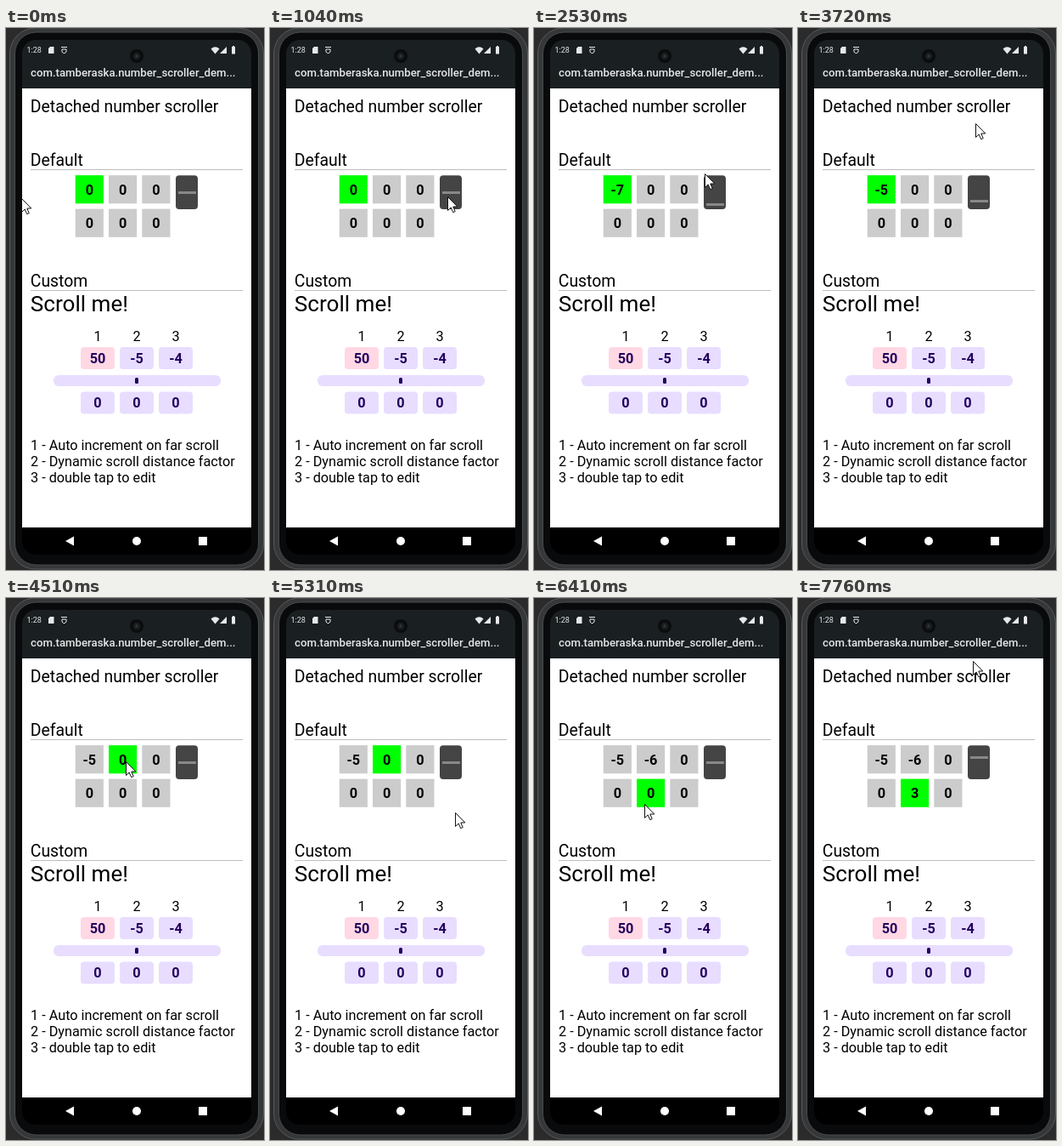
An HTML page that plays this animation: 304 px wide and 637 px high, repeating every 8000 ms.

```html
<!DOCTYPE html>
<html lang="en">
<head>
<meta charset="utf-8">
<title>Number scroller</title>
<style>
  html, body { margin: 0; width: 100%; height: 100%; overflow: hidden; background: #2b2b2c; }
  svg { display: block; width: 304px; height: 637px; font-family: Roboto, sans-serif; }
  .heading { font-size: 19.4px; }
  .large { font-size: 26.1px; }
  .note { font-size: 16.25px; }
  .mid { text-anchor: middle; }
  .number { font-size: 16.3px; font-weight: 700; text-anchor: middle; }
  .custom { fill: #21005d; }
  .light { fill: #e6e8e9; }
</style>
</head>
<body>
<svg viewBox="0 0 304 637">
  <rect width="304" height="637" fill="#2b2b2c"/>
  <rect x="4.5" y="0" width="299" height="636" rx="30" fill="#353739" stroke="#55585a"/>
  <rect x="10.5" y="5" width="287" height="626" rx="25" fill="#090a0b" stroke="#484b4d"/>

  <path d="M19 71V30a16 16 0 0 1 16-16H273a16 16 0 0 1 16 16V71Z" fill="#1a1f21"/>
  <rect x="19" y="71" width="270" height="516" fill="#fff"/>
  <path d="M19 587H289V603a16 16 0 0 1-16 16H35a16 16 0 0 1-16-16Z" fill="#000"/>

  <circle cx="154" cy="33" r="8" fill="#0b0c0d"/>
  <circle cx="154" cy="33" r="4.500" fill="#171b1d"/>
  <circle cx="154" cy="33" r="2" fill="#2a3436"/>

  <g class="light">
    <text x="24.500" y="29.300" font-size="9">1:28</text>
    <path d="M52 22h4.500v8h-6.500v-6Z"/>
    <path d="M65 22.500h7M66 25h5v3l-1.500 1.500h-2l-1.500-1.500Z" fill="none" stroke="#e6e8e9"/>
    <path d="M241.500 24.500q5-4.500 10 0l-5 6Z"/>
    <path d="M260 22v8h-8Z"/>
    <path d="M266 22h1v-1h2v1h1v8.500h-4Z"/>
    <text x="29" y="57.300" font-size="13.200" font-weight="500">com.tamberaska.number_scroller_dem...</text>
  </g>

  <g class="heading">
    <text x="28.800" y="99">Detached number scroller</text>
    <text x="28.800" y="162">Default</text>
    <text x="28.800" y="304">Custom</text>
  </g>
  <path d="M29 166.500H279M29 308.500H279" stroke="#bdbdbd"/>
  <text class="large" x="28.800" y="333">Scroll me!</text>

  <g id="cells"></g>
  <rect x="200" y="173.200" width="26" height="39.800" rx="4" fill="#444"/>
  <rect id="knob" x="203" y="192" width="21" height="3" fill="#888"/>

  <rect x="56" y="408" width="197" height="13" rx="6" fill="#e8ddff"/>
  <rect x="152" y="411" width="4" height="7" rx="1.500" fill="#21005d"/>

  <g class="note">
    <text x="29" y="496">1 - Auto increment on far scroll</text>
    <text x="29" y="515">2 - Dynamic scroll distance factor</text>
    <text x="29" y="534">3 - double tap to edit</text>
  </g>

  <g fill="#fff">
    <path d="M70 603l10-5.500v11Z"/>
    <circle cx="154" cy="603" r="5"/>
    <rect x="227" y="598" width="10" height="10"/>
  </g>
  <path id="cursor" d="M.5 .5V16.500L4.200 13 6.700 18.700 9.200 17.600 6.800 12H11.800Z" fill="#fff" stroke="#111"/>
</svg>
<script>
const LOOP = 8000;

// path points are [progress, x, y]; drag is [cell, from, to]
const moves = [
  { start: 70, end: 550, steps: 7, path: [[.15, 26, 199], [.6, 150, 187], [.85, 200, 190], [1, 208, 196]] },
  { start: 1040, end: 1810, steps: 11, path: [[1 / 11, 209, 198], [.4, 216, 250], [.8, 230, 350], [1, 233, 383]], drag: [0, 0, -7] },
  { start: 1900, end: 1900, steps: 1, path: [[1, 233, 387]] },
  { start: 2300, end: 2850, steps: 8, path: [[.125, 232, 372], [.5, 201, 171], [.625, 203, 167], [1, 212, 198]] },
  { start: 3330, end: 3720, steps: 6, path: [[1 / 6, 212, 188], [5 / 6, 209, 110], [1, 209, 112]], drag: [0, -7, -5] },
  { start: 3990, end: 4510, steps: 8, path: [[.125, 206, 118], [.6, 160, 170], [.875, 143, 193], [1, 141, 192]], select: 1 },
  { start: 4760, end: 5150, steps: 6, path: [[1 / 6, 150, 191], [4 / 6, 205, 185], [1, 218, 188]] },
  { start: 5310, end: 5710, steps: 6, path: [[1 / 6, 218, 252], [.6, 228, 360], [1, 235, 406]], drag: [1, 0, -6] },
  { start: 5940, end: 6410, steps: 7, path: [[1 / 7, 230, 398], [.6, 165, 290], [1, 130, 242]], select: 4 },
  { start: 6750, end: 7210, steps: 7, path: [[1 / 7, 129, 240], [5 / 7, 237, 190], [1, 216, 200]] },
  { start: 7380, end: 7760, steps: 6, path: [[1 / 6, 215, 188], [.8, 207, 85], [1, 206, 74]], drag: [4, 0, 3] }
];

const layer = document.getElementById('cells');
const knob = document.getElementById('knob');
const cursor = document.getElementById('cursor');

function add(tag, attrs, content = '') {
  const node = document.createElementNS('http://www.w3.org/2000/svg', tag);
  for (const name in attrs) node.setAttribute(name, attrs[name]);
  node.textContent = content;
  return layer.appendChild(node);
}

const cells = Array.from({ length: 6 }, (_, i) => {
  const x = 81.7 + 39.3 * (i % 3), y = 173.1 + 39.5 * Math.floor(i / 3);
  return {
    box: add('rect', { x, y, width: 33.2, height: 33.2 }),
    label: add('text', { x: x + 16.6, y: y + 22.7, class: 'number' })
  };
});

['50', '-5', '-4', '0', '0', '0'].forEach((value, i) => {
  const x = 88 + 46 * (i % 3), y = i < 3 ? 375 : 427.6;
  add('rect', { x, y, width: 40, height: 26, rx: 4, fill: i ? '#e8ddff' : '#ffd8e4' });
  add('text', { x: x + 20, y: y + 18.8, class: 'number custom' }, value);
  if (i < 3) add('text', { x: x + 20, y: 368, class: 'note mid' }, i + 1);
});

function along(from, path, progress) {
  let a = [0, ...from];
  for (const b of path) {
    if (progress <= b[0] + 1e-6) {
      const f = (progress - a[0]) / (b[0] - a[0]);
      return [1, 2].map(i => a[i] + (b[i] - a[i]) * f);
    }
    a = b;
  }
  return a.slice(1);
}

function stateAt(time) {
  const state = { pos: [18, 200], selected: 0, values: [0, 0, 0, 0, 0, 0] };
  for (const { start, end, steps, path, drag, select } of moves) {
    if (time < start) break;
    const gap = (end - start) / (steps - 1 || 1);
    const step = time >= end ? steps : Math.min(steps, 1 + Math.floor((time - start) / gap + .1));
    state.pos = along(state.pos, path, step / steps);
    if (drag) {
      const [cell, from, to] = drag;
      // the number trails the pointer by one step
      state.values[cell] = from + Math.trunc((to - from) * (step - 1) / (steps - 1));
    }
    if (select && step === steps) state.selected = select;
  }
  return state;
}

function render(now) {
  const { pos, selected, values } = stateAt(now % LOOP);
  cells.forEach(({ box, label }, i) => {
    box.setAttribute('fill', i === selected ? '#0f0' : '#ccc');
    label.textContent = values[i];
  });
  knob.setAttribute('y', 192 - 2 * values[selected]);
  cursor.setAttribute('transform', `translate(${pos.map(Math.round)})`);
}

let origin;
function tick(now) {
  origin ??= now;
  render(now - origin);
  requestAnimationFrame(tick);
}
render(0);
requestAnimationFrame(tick);
</script>
</body>
</html>
```
